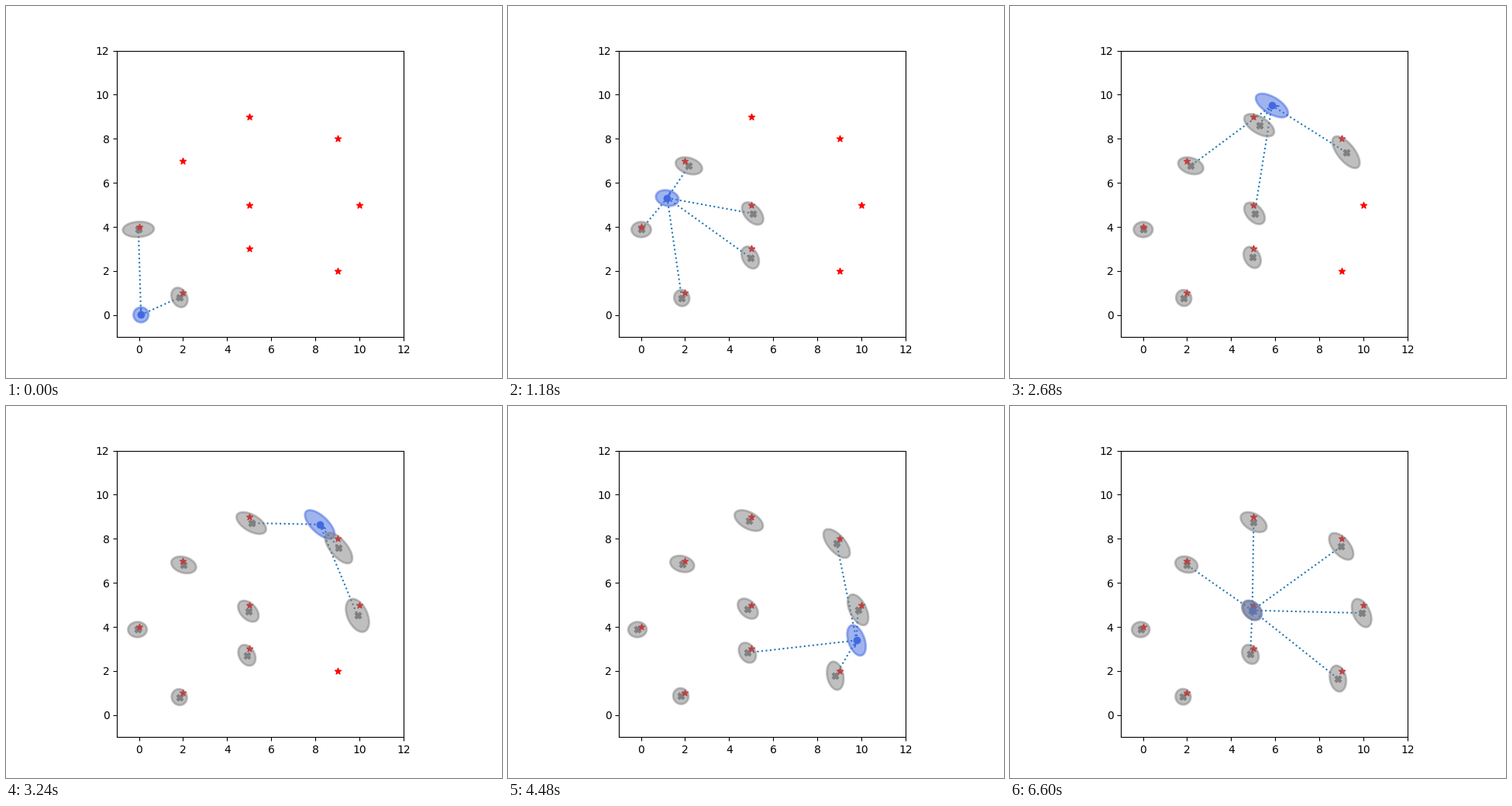
A matplotlib script that plays this animation: 640x480 px, repeating every 6.62 s.

```python
import numpy as np
import matplotlib.pyplot as plt
from matplotlib.animation import FuncAnimation
from matplotlib.patches import Ellipse

FRAMES, INTERVAL = 331, 20
PX = 28.43          # pixels per data unit
RANGE = 5.0         # sensor range
SPEED = 0.095       # units per step
BLUE = "royalblue"
SHIFT = np.array([-0.204, -0.12])   # constant offset of the estimated map

LANDMARKS = np.array([(0, 4), (2, 1), (2, 7), (5, 9), (5, 5),
                      (5, 3), (9, 8), (10, 5), (9, 2)], float)

# Key poses: step, x, y, rotation error of the map
STEPS, X, Y, TURN = np.array([
    (0, 0.09, 0.01, 0.015), (59, 1.19, 5.31, 0.054), (134, 5.85, 9.51, 0.053),
    (191, 9.70, 6.56, 0.013), (224, 9.78, 3.39, 0.0105),
    (276, 6.90, 1.11, 0.0), (330, 4.96, 4.75, 0.025)]).T
POS = np.column_stack([X, Y])
AHEAD = np.gradient(POS, STEPS, axis=0, edge_order=2)
AHEAD /= np.linalg.norm(AHEAD, axis=1, keepdims=True)


def across(v):
    return np.array([-v[1], v[0]])


def robot(i):
    """Position and heading on a Hermite curve through the key poses."""
    k = min(np.searchsorted(STEPS, i, side="right") - 1, len(STEPS) - 2)
    span = STEPS[k + 1] - STEPS[k]
    u = (i - STEPS[k]) / span
    p, q = POS[k:k + 2]
    m, n = SPEED * span * AHEAD[k:k + 2]
    xy = ((2*u**3 - 3*u**2 + 1) * p + (u**3 - 2*u**2 + u) * m
          + (3*u**2 - 2*u**3) * q + (u**3 - u**2) * n)
    d = (6*u**2 - 6*u) * (p - q) + (3*u**2 - 4*u + 1) * m + (3*u**2 - 2*u) * n
    return xy, d / np.hypot(*d)


def drift(i):
    r = np.interp(i, STEPS, TURN)
    return np.array([[1, r], [-r, 1]])


def visible(i):
    true = np.linalg.solve(drift(i), robot(i)[0] - SHIFT)
    return np.hypot(*(LANDMARKS - true).T) < RANGE


SEEN = np.array([visible(i) for i in range(FRAMES)])
BIRTH = SEEN.argmax(axis=0)


def covariance(xy, i):
    """Heading error spreads everything sideways as seen from the start."""
    spread = (2.15 - 0.002 * i) * across(xy)
    return (95 + 0.15 * xy @ xy) * np.eye(2) + np.outer(spread, spread)


def landmark(j, i):
    """Estimated place and covariance (px); bearing noise fades with age."""
    age = i - BIRTH[j]
    xy = drift(i) @ LANDMARKS[j] + SHIFT
    side = across(xy - robot(BIRTH[j])[0]) * np.exp(-age / 6)
    blur = 0.14 * PX * side
    return xy - 0.03 * side, covariance(xy, i) + np.outer(blur, blur)


def place(patch, xy, cov):
    w, v = np.linalg.eigh(cov)
    patch.set_center(xy)
    patch.width, patch.height = 2 * np.sqrt(w[::-1]) / PX
    patch.angle = np.degrees(np.arctan2(v[1, 1], v[0, 1]))


fig, ax = plt.subplots(figsize=(6.4, 4.8), dpi=100)
ax.set_aspect("equal")
ax.set_xlim(-1, 12)
ax.set_ylim(-1, 12)


def blob(color):
    return ax.add_patch(Ellipse((0, 0), 1, 1, color=color, alpha=0.5,
                                lw=2, zorder=2))


body = blob(BLUE)
blobs = [blob("gray") for _ in LANDMARKS]
rays = [ax.plot([], [], ":", color="C0", lw=1.5, zorder=1)[0]
        for _ in LANDMARKS]
nose, = ax.plot([], [], color=BLUE, lw=1.5, zorder=1.2)
crosses = ax.scatter([], [], marker="X", color="gray", zorder=1.1)
dot = ax.scatter([], [], color=BLUE, zorder=1.2)
ax.scatter(*LANDMARKS.T, marker="*", color="red", zorder=1.3)


def draw(i):
    xy, ahead = robot(i)
    place(body, xy, covariance(xy, i))
    dot.set_offsets([xy])
    nose.set_data(*np.array([xy, xy + 0.3 * ahead]).T)
    found = []
    for j, (patch, ray) in enumerate(zip(blobs, rays)):
        known = i >= BIRTH[j]
        patch.set_visible(known)
        ray.set_visible(SEEN[i, j])
        if known:
            spot, cov = landmark(j, i)
            place(patch, spot, cov)
            ray.set_data(*np.array([xy, spot]).T)
            found.append(spot)
    crosses.set_offsets(found)
    return [body, dot, nose, crosses, *blobs, *rays]


anim = FuncAnimation(fig, draw, frames=FRAMES, interval=INTERVAL,
                     repeat=True, repeat_delay=0)
plt.show()
```
